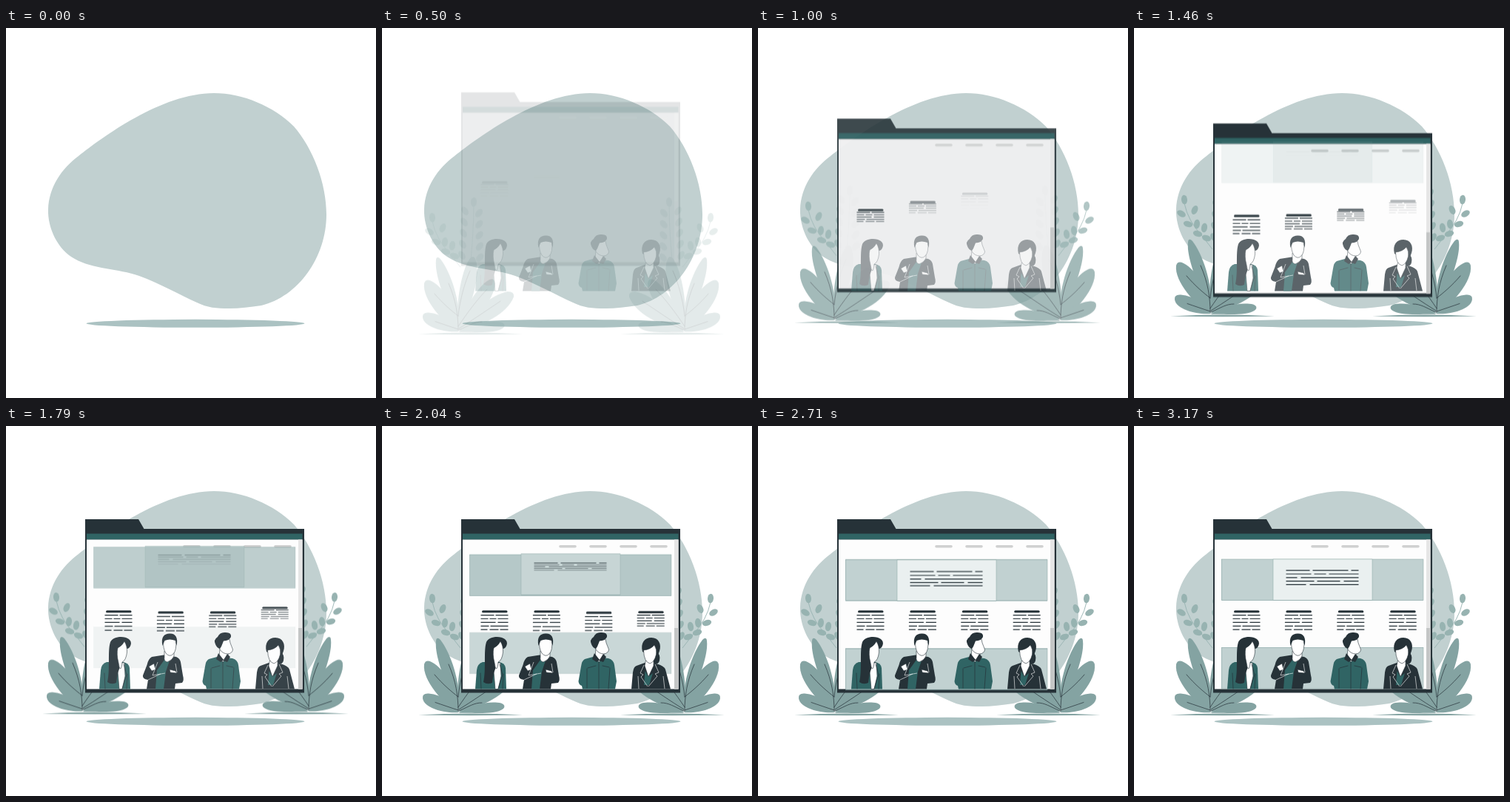
Write an HTML page that moves like this. It is 500 px wide and 500 px high and loops after 3.21 s.

```html
<!DOCTYPE html>
<html lang="en">
<head>
<meta charset="utf-8">
<title>Team page</title>
<style>
  html, body { margin: 0; height: 100%; overflow: hidden; background: #fff; }
  svg { display: block; width: 100%; height: 100%; }
  .dark { fill: #263238; }
  .teal { fill: #306464; }
  .skin { fill: #fff; stroke: #263238; stroke-width: .6; }
  .ink { fill: none; stroke: #263238; stroke-width: .7; stroke-linecap: round; }
  .seam { fill: none; stroke: #fff; stroke-width: .6; }
  .leaf { fill: #84a3a2; }
  .sprig { fill: #97b3b1; }
  .twig { fill: none; stroke: #97b3b1; stroke-width: .9; }
</style>
</head>
<body>
<svg viewBox="0 0 500 500">
  <defs>
    <g id="plant">
      <g id="sprigs"></g>
      <path class="leaf" d="M49 390.5Q120 386.500 190 390.500Q120 391.800 49 390.500Z"/>
      <path class="leaf" d="M104 384C93 365 70 314 73 290Q74 284 79 289C92 306 107 345 104 384Z"/>
      <path class="leaf" d="M103 385C84 378 54 343 57 322Q59 315 67 319C86 329 101 358 103 385Z"/>
      <path class="leaf" d="M104 387C87 389 57 382 55 368Q54 361 63 361.500C82 363 96 375 104 387Z"/>
      <path class="leaf" d="M103 384C99 355 106 306 119 288Q124 283 127 291C134 318 116 363 103 384Z"/>
      <path class="leaf" d="M103 386C108 362 128 326 145 317Q152 314 153 322C151 346 124 374 103 386Z"/>
      <path class="leaf" d="M104 387C118 362 148 337 170 333Q179 333 178 340C170 363 134 380 104 387Z"/>
      <path class="leaf" d="M104 388C120 376 146 371 161 374.500Q168 377 164 382C152 391 122 387 104 388Z"/>
      <path class="ink" d="M103 385C103 365 100 345 90 322M103 366C94 359 83 350 71 336M103 384C94 381 82 377 72 373.500M103 366C105 345 112 320 119 305M103 380C115 362 130 342 142 330M104 383C122 372 142 358 160 346M104 385C118 379 124 374 135 374"/>
    </g>
  </defs>

  <path fill="#c1d0d0" d="M98 173C130 148 210 88 281 88C320 88 362 106 389 133C415 163 433 210 433 252C433 310 395 363 345 375C330 377 316 379 302 379C284 379 272 378 258 371C235 361 208 345 180 335C152 325 117 326 93 312C70 300 56 270 57 245C58 215 75 190 98 173Z"/>
  <ellipse cx="256" cy="399.300" rx="147.500" ry="5.500" fill="#abc2c2"/>

  <g id="plants">
    <use href="#plant"/>
    <use href="#plant" transform="matrix(-1 0 0 1 512 0)"/>
  </g>

  <g id="window">
    <path class="dark part" d="M107 126H179L186.500 139H403V360.500H107Z"/>
    <rect class="teal part" x="109" y="145.500" width="291.500" height="8"/>
    <rect class="part" x="109" y="153.500" width="291.500" height="202" fill="#fdfdfd"/>
    <rect class="part" x="395" y="153.500" width="5.500" height="202" fill="#e6e6e6"/>
    <rect class="part" x="395" y="273" width="5.500" height="82.500" fill="#c4c6c6"/>
    <g id="page"></g>
  </g>

  <g id="people">
    <g>
      <path class="teal" d="M136 319Q129 321 128 330L126 355.500H168L167 327Q166 320 158 319Z"/>
      <path class="skin" d="M150 320L153 355.500H157L161 338L160 320Z"/>
      <path class="dark" d="M141 292C144 284 160 283 166 288Q170 291 168.500 296Q167 301 163 301L156 320L151 334L149 347Q142 350 137 346C141 330 137 304 141 292Z"/>
      <path class="skin" d="M151 300Q157 297 160 291Q164 297 163.500 306Q162 317 157 319L156.500 324Q154 334 152 320Q149 308 151 300Z"/>
      <path class="ink" d="M133 334L134 355M164 335L163 355M159 322L163 336L157 355"/>
    </g>
    <g>
      <path class="dark" d="M213 309.500L197 312Q192 315 190.500 323L185 337Q184 342 192 343L190 355.500H228L229 348L238 347Q241 344 239 337L236 319Q235 314 230 312Z"/>
      <path class="teal" d="M214 316L204 330L202 355.500H213L216 332L221 317Z"/>
      <path class="skin" d="M214 304V312Q213 318 218 319Q225 316 227 311V303Z"/>
      <path class="skin" d="M212.500 289Q220 284 229.500 289Q231 303 226 308Q221 313 216 307Q212 301 212.500 289Z"/>
      <path class="dark" d="M211.500 297C209 285 214 280.500 221 280.500C229 280 233 286 230.500 297L229 290Q221 287 214.500 290Z"/>
      <path class="skin" d="M193 325L200 321L202 329L197 331ZM221 329L229 331L231 334L222 333Z"/>
      <path class="seam" d="M205 319L198 337L215 334M229 321L231 333M192 343L209 335"/>
    </g>
    <g>
      <path class="teal" d="M285 312L274 315Q270 317 269 325L265.500 345Q266 350 270 351L271 355.500H315L317 345L314 323Q313 316 306 314Z"/>
      <path class="skin" d="M289 301L288 312L293 319L300 313V306Z"/>
      <path class="skin" d="M288 294Q294 285 302 288L303 293L306.500 302Q306 307 300 308Q293 308 289 302Z"/>
      <path class="dark" d="M283 295Q280 289 286 285Q289 278 297 279Q305 279 304 285Q302 290 294 290.500L291 298L289 301Q285 300 283 295Z"/>
      <path class="dark" d="M287 307L284 315L290 319L293 317L299 319L303 312L299 308L294 316Z"/>
      <path class="ink" d="M293 319V355M277 328V354M308 327L306 355M278 327L289 324M298 324L307 326"/>
    </g>
    <g>
      <path class="dark" d="M370 304Q377 309 375 317Q374 322 368 322L364 312Z"/>
      <path class="dark" d="M355 320L344 324Q340 325 339 333L337 355.500H390L383 329Q381 324 372 321.500Z"/>
      <path class="skin" d="M357 314L355 324L360 339L367 324L367 313Z"/>
      <path class="teal" d="M355.500 331L354 350H361L366 334L360 339Z"/>
      <path class="dark" d="M352 305C349 293 355 286 364 286C374 286 378 295 375 304Q373 312 367 314Z"/>
      <path class="skin" d="M353.500 303Q363 302 368 296Q372 302 370.500 309Q368 319 362 321Q354 319 353.500 303Z"/>
      <path class="seam" d="M354 323L349 334L353 336L350 339L359 352M369 322L374 333L369 335L372 338L360 352M346 338L347 355M380 338L382 355"/>
    </g>
  </g>
</svg>
<script>
const LOOP = 3210;
const SPRING = 'cubic-bezier(.36,-.01,.5,1.38)';
const INK = '#263238';
const $ = id => document.getElementById(id);

function add(parent, tag, attrs = {}) {
  const el = document.createElementNS('http://www.w3.org/2000/svg', tag);
  for (const k in attrs) el.setAttribute(k, attrs[k]);
  return parent.appendChild(el);
}

const loop = (el, frames) => el.animate(frames, { duration: LOOP, iterations: Infinity });

// Fade in while sliding from dy to rest.
function slide(el, start, dur, dy = -30) {
  const from = { opacity: 0, transform: `translateY(${dy}px)` };
  const to = { opacity: 1, transform: 'translateY(0px)' };
  loop(el, [
    { ...from, offset: 0 },
    { ...from, offset: start / LOOP, easing: SPRING },
    { ...to, offset: (start + dur) / LOOP },
    { ...to, offset: 1 }
  ]);
}

// Sprigs: each entry is x, y, tilt of one small leaf.
function sprig(stem, leaves) {
  add($('sprigs'), 'path', { class: 'twig', d: stem });
  for (const [x, y, tilt] of leaves)
    add($('sprigs'), 'ellipse', { class: 'sprig', cx: x, cy: y, rx: 4, ry: 6.3, transform: `rotate(${tilt} ${x} ${y})` });
}
sprig('M68 238Q73 262 92 282L106 300', [
  [68, 233, -5], [64, 252, -60], [82, 247, 25], [73, 266, -75],
  [85, 266, 5], [95, 271, 10], [86, 279, -75], [98, 285, -70]
]);
const pairs = [[124, 212, 5]];
for (let i = 0; i < 5; i++)
  pairs.push([112 - i, 224 + i * 15, -35], [131 + i * .3, 227 + i * 15, 40]);
sprig('M124 214Q124 260 117 320', pairs);

document.querySelectorAll('.part').forEach(el => slide(el, 0, 1600));
slide($('window'), 0, 1600);
slide($('plants'), 0, 2000, 30);

const page = $('page');

function stroke(x, y, w, width, color, dash) {
  const attrs = { d: `M${x} ${y}h${w}`, stroke: color, 'stroke-width': width, fill: 'none' };
  if (dash) attrs['stroke-dasharray'] = dash;
  else attrs['stroke-linecap'] = 'round';
  return add(page, 'path', attrs);
}

// Teal panel lightened by a white sheet.
function panel(x, y, w, white, start) {
  const box = { x, y, width: w, height: 55.5 };
  slide(add(page, 'rect', { ...box, class: 'teal' }), start, 1500);
  slide(add(page, 'rect', { ...box, fill: '#fff', 'fill-opacity': white }), start, 1500);
  slide(add(page, 'rect', { ...box, fill: 'none', stroke: '#8aa6a5', 'stroke-width': .5 }), start, 1500);
}

for (let i = 0; i < 4; i++)
  slide(stroke(241 + i * 41, 162.8, 20, 3.6, '#d0d1d1'), 105, 1500);

panel(118.5, 180, 272.5, .7, 1250);
panel(188, 180, 134, .9, 1280);
['32 4 48 4 10', '34 4 16 4 40', '15 5 78', '38 4 31 5 20', '27 5 66'].forEach((dash, i) =>
  slide(stroke(205.5, 195.2 + i * 4.8, 98.5, 1.2, INK, dash + ' 99'), 1350 + i * 55, 1500));

panel(118.5, 299.5, 272.5, .7, 1590);

const rows = ['18 2 17', '10 2 9 2 14', '20 3 14', '11 2 24', '9 3 12 2 11'];
for (let c = 0; c < 4; c++) {
  const x = 133.5 + c * 70.4, start = 110 + c * 285;
  slide(stroke(x + 3, 250.7, 31.5, 3, INK), start, 1500);
  rows.forEach((dash, i) =>
    slide(stroke(x, 255.6 + i * 4.9, 37, 1.2, INK, dash + ' 99'), start + 60 + i * 47, 1500));
}

loop($('people'), [[0, 0], [710, .28], [1000, .42], [1460, .75], [1790, .92], [2050, 1], [LOOP, 1]]
  .map(([t, opacity]) => ({ offset: t / LOOP, opacity })));
</script>
</body>
</html>
```
